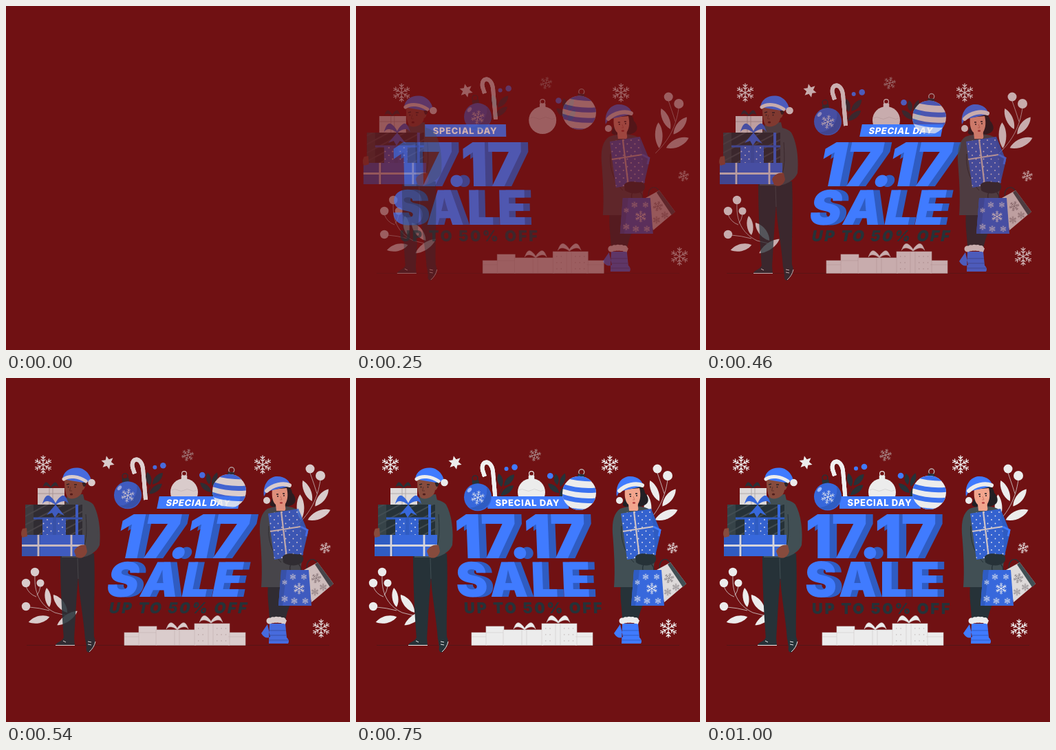
Animation of 500 by 500 pixels, one loop 1040 ms. Source, as an HTML page:

```html
<!DOCTYPE html>
<html lang="en">
<head>
<meta charset="utf-8">
<title>Special day sale</title>
<style>
html, body { margin: 0; width: 100%; height: 100%; overflow: hidden; background: #701113; }
svg { display: block; width: 100vw; height: 100vh; }
.art { opacity: var(--fade, 0); }
.fromRight { transform: translateX(calc(var(--d) * 1px)); }
.fromLeft { transform: translateX(calc(var(--d) * -1px)); }
.fromTop { transform: translateY(calc(var(--d) * -1px)); }
.fromTopLeft { transform: translate(calc(var(--d) * -.55px), calc(var(--d) * -.6px)); }
.fromTopRight { transform: translate(calc(var(--d) * .75px), calc(var(--d) * -.3px)); }
.hang { transform: translateY(calc(var(--d) * -.75px)); }
.title {
  opacity: var(--titleFade, 0);
  transform-origin: 0 335px;
  transform: translateX(calc(var(--x) * 1px)) skewX(calc(var(--lean) * 1rad));
  font-family: Inter, "Open Sans", sans-serif;
  font-weight: 900;
  text-anchor: middle;
}
.date { font-size: 88px; letter-spacing: -1.6px; }
.sale { font-size: 69.5px; letter-spacing: 4.8px; }
.offer { font-size: 22px; letter-spacing: 2.5px; fill: #263238; }
.tag { font-size: 13px; font-weight: 800; letter-spacing: .7px; fill: #fff; }
.blue { fill: #407bff; }
.deep { fill: #2f5cc2; }
.mid { fill: #3768dc; }
.dark { fill: #263238; }
.coat { fill: #414f54; }
.white { fill: #ececec; }
.line { fill: none; stroke: #ececec; }
.thin { fill: none; stroke: #d9d5d5; stroke-width: .8; }
.flake { fill: none; stroke: #f0f0f0; stroke-width: 1.35; stroke-linecap: round; }
.grey { stroke: #8b8589; }
.faint { stroke: #a88a8a; }
.manSkin { fill: #874b3d; }
.skin { fill: #f2a58d; }
</style>
</head>
<body>
<svg viewBox="0 0 500 500">
  <defs>
    <path id="arm" d="M0 0V-13M-2.800 -11.500L0 -8.800L2.800 -11.500M-2.800 -7.500L0 -5L2.800 -7.500"/>
    <g id="flake">
      <use href="#arm"/><use href="#arm" transform="rotate(60)"/><use href="#arm" transform="rotate(120)"/>
      <use href="#arm" transform="rotate(180)"/><use href="#arm" transform="rotate(240)"/><use href="#arm" transform="rotate(300)"/>
    </g>
    <path id="leaf" d="M0 15C-7 6 -6 -8 0 -15C6 -8 7 6 0 15Z"/>
    <path id="bow" d="M0 5C-6 0 -13 -1 -16 4C-13 -5 -10 -7 -6 -4C-3 -2 -1 1 0 3C1 1 3 -2 6 -4C10 -7 13 -5 16 4C13 -1 6 0 0 5Z"/>
    <g id="cap"><circle cy="-7" r="4" fill="none" stroke-width="1.4"/><rect x="-5" y="-4" width="10" height="7" rx="1" stroke="none"/></g>
    <pattern id="dots" width="11" height="11" patternUnits="userSpaceOnUse">
      <rect width="11" height="11" fill="#3462cf"/>
      <circle cx="2.5" cy="2.5" r=".9" fill="#e6e6f0"/><circle cx="8" cy="8" r=".9" fill="#e6e6f0"/>
    </pattern>
    <pattern id="hatch" width="11" height="11" patternUnits="userSpaceOnUse" patternTransform="rotate(-28)">
      <rect width="11" height="11" fill="#263238"/><path d="M0 5H11" stroke="#59646a" stroke-width="1"/>
    </pattern>
    <clipPath id="round"><circle cx="324.5" cy="166.5" r="24.5"/></clipPath>
  </defs>

  <!-- floor, plants, snow -->
  <path class="art" d="M30 388.500H470" stroke="#4d1719" stroke-width=".8"/>
  <g class="art"><g class="fromRight">
    <g class="flake">
      <use href="#flake" x="51" y="126"/>
      <use href="#flake" x="370" y="126"/>
      <use href="#flake" x="455" y="364"/>
      <use href="#flake" transform="translate(461 247) rotate(12) scale(.6)"/>
      <use class="faint" href="#flake" transform="translate(261 112) rotate(14) scale(.68)"/>
    </g>
    <g transform="translate(145 123) rotate(-12)">
      <path class="white" d="M0 -10L2.500 -4.300L8.700 -5L5 0L8.700 5L2.500 4.300L0 10L-2.500 4.300L-8.700 5L-5 0L-8.700 -5L-2.500 -4.300Z"/>
    </g>
    <g transform="translate(256 145)"><use href="#cap" fill="#ececec" stroke="#ececec" transform="scale(.85)"/></g>
    <circle class="white" cx="256" cy="166" r="20"/>
    <path d="M238 163q4 -3 9 0t9 0t9 0t9 0" fill="none" stroke="#d8d8d8"/>
    <path class="thin" d="M39 288C38 310 45 330 68 341L92 347M26 303Q30 314 41 318M47 303Q46 310 42 316M31 333Q45 334 60 338"/>
    <g class="white">
      <circle cx="39" cy="282" r="6.200"/><circle cx="26" cy="298" r="6.200"/>
      <circle cx="47" cy="298" r="5.500"/><circle cx="26" cy="332" r="6.200"/>
      <use href="#leaf" transform="translate(58 319) rotate(-8) scale(.9 .95)"/>
      <use href="#leaf" transform="translate(76 328) rotate(-38) scale(1.100)"/>
      <use href="#leaf" transform="translate(45 351) rotate(76) scale(1.050)"/>
      <use href="#leaf" transform="translate(86 349) rotate(55) scale(1 1.200)"/>
    </g>
    <path class="thin" d="M454 148C450 175 440 195 420 214M439 138Q445 155 449 168"/>
    <g class="white">
      <circle cx="439" cy="132" r="6.500"/><circle cx="454" cy="142" r="7"/>
      <use href="#leaf" transform="translate(435 164) rotate(-24) scale(1 1.100)"/>
      <use href="#leaf" transform="translate(456 174) rotate(38) scale(1.050)"/>
      <use href="#leaf" transform="translate(425 188) rotate(-2) scale(1.100 1.250)"/>
      <use href="#leaf" transform="translate(452 199) rotate(66) scale(1.200)"/>
    </g>
  </g></g>
  <g class="art"><g class="fromTopLeft">
    <circle class="blue" cx="230" cy="129" r="4.300"/><circle class="blue" cx="218" cy="131.500" r="3"/>
    <g class="dark">
      <use href="#leaf" transform="translate(209 148) rotate(-12) scale(.8 .65)"/>
      <use href="#leaf" transform="translate(222 148) rotate(42) scale(.85 .75)"/>
      <use href="#leaf" transform="translate(219 163) rotate(52) scale(.85 .8)"/>
    </g>
    <path d="M204 177Q208 168 212 160" fill="none" stroke="#263238"/>
  </g></g>
  <g class="art"><g class="fromTopRight">
    <circle class="blue" cx="283" cy="142" r="4.300"/>
    <g class="dark">
      <use href="#leaf" transform="translate(292 147) rotate(-8) scale(.7 .55)"/>
      <use href="#leaf" transform="translate(301 148) rotate(20) scale(.7)"/>
      <use href="#leaf" transform="translate(288 160) rotate(-50) scale(.8 .7)"/>
      <use href="#leaf" transform="translate(302 164) rotate(30) scale(.8 .7)"/>
    </g>
  </g></g>
  <g class="art"><g class="fromTop" fill="none" stroke-width="5.800">
    <path id="cane" d="M203 180L199 134C196 116 181 119 184 133L187 142" stroke="#f0f0f0"/>
    <use href="#cane" style="stroke:#407bff"/>
    <path d="M203 180L199 134C196 116 181 119 184 133L187 142" stroke="#f0f0f0" stroke-dasharray="4.200 4.200"/>
  </g></g>

  <!-- title -->
  <g class="title">
    <rect class="blue" x="194" y="172" width="118" height="18"/>
    <text class="tag" x="252.500" y="185.700">SPECIAL DAY</text>
    <g class="date">
      <text class="deep" x="249.500" y="262">17.17</text>
      <text class="blue" x="239" y="262">17.17</text>
    </g>
    <g class="sale">
      <text class="deep" x="253.500" y="318">SALE</text>
      <text class="blue" x="244" y="318">SALE</text>
    </g>
    <text class="offer" x="255.500" y="342.500">UP TO 50% OFF</text>
  </g>

  <!-- hanging ornaments -->
  <g class="art"><g class="hang">
    <use href="#cap" transform="translate(174 152) rotate(-8)" fill="#263238" stroke="#263238"/>
    <circle class="mid" cx="177" cy="172.500" r="20"/>
    <path class="deep" d="M190 157A20 20 0 0 1 165 188A26 26 0 0 0 190 157Z"/>
    <g class="flake"><use href="#flake" transform="translate(177 173) rotate(10) scale(.75)" stroke-width="1"/></g>
    <ellipse cx="165" cy="162" rx="2.500" ry="4" transform="rotate(40 165 162)" fill="#9dbbff"/>
  </g></g>
  <g class="art"><g class="hang">
    <use href="#cap" transform="translate(327 143) rotate(6)" fill="#263238" stroke="#b9b0b0"/>
    <circle class="white" cx="324.500" cy="166.500" r="24.500"/>
    <g clip-path="url(#round)" fill="none" stroke="#3b72f0">
      <path d="M300 140Q325 147 350 146" stroke-width="7"/>
      <path d="M298 156Q324 165 351 162" stroke-width="7"/>
      <path d="M298 171Q324 180 351 177" stroke-width="7"/>
      <path d="M298 186Q320 195 345 191" stroke-width="5"/>
    </g>
  </g></g>

  <!-- parcels on the floor -->
  <g class="art"><g class="fromRight">
    <g class="white" stroke="#cfc9c9" stroke-width=".6">
      <rect x="169" y="370" width="22" height="18.500"/>
      <rect x="190" y="361" width="26" height="27.500"/>
      <rect x="320" y="370" width="25" height="18.500"/>
      <rect x="215" y="366" width="58" height="22.500"/>
      <rect x="271" y="357" width="51" height="31.500"/>
      <path d="M242 366V388M249 366V388M291 357V388M298 357V388M190 370H215M320 376H345M169 376H190" fill="none"/>
      <use href="#bow" x="246" y="361"/>
      <use href="#bow" transform="translate(295 351) scale(1.050)"/>
    </g>
    <path d="M276 364H288M276 373H288M276 382H288M303 364H320M303 373H320M303 382H320" stroke="#c8c2c2" stroke-width="1.400" stroke-dasharray="1.400 5"/>
  </g></g>

  <!-- man with boxes -->
  <g class="art"><g class="fromLeft">
    <path class="dark" d="M82 255H131C133 300 130 340 131 379L118 380C116 350 109 315 108 290C105 320 104 350 102 379H87C84 340 82 300 82 255Z"/>
    <path d="M107 262L108 292" stroke="#414f54" fill="none"/>
    <path class="dark" d="M87 377H102L103 389H75C75 384 84 384 87 377ZM118 378L131 376C135 386 132 391 124 399C120 399 119 395 120 391Z"/>
    <path class="line" d="M75 388.500H103M133 383Q131 392 124 398M86 382l4 2M122 383l5 1M122 387l5 1" stroke-width="1"/>
    <path class="coat" d="M90 176C104 174 123 176 130 184C138 198 141 222 139 243C135 253 122 260 112 261H84V200Z"/>
    <path class="coat" d="M92 170L115 169L118 182H90Z"/>
    <path d="M119 198C120 215 121 230 117 243" fill="none" stroke="#263238" stroke-width="1"/>
    <path class="manSkin" d="M88 147H114C119 152 119 162 114 163C113 172 103 177 95 175C89 172 88 160 88 147Z"/>
    <path d="M113 149H119C120 154 119 158 116 158C114 156 114 153 113 149Z" fill="#2a2427"/>
    <path d="M91 155l4 -1M102 155l4 0" stroke="#2a2427" stroke-width="1.300"/>
    <circle cx="93.500" cy="158.500" r="1" fill="#2a2427"/><circle cx="103.500" cy="158.500" r="1" fill="#2a2427"/>
    <path d="M97 158L95.500 164H99" fill="none" stroke="#63352c"/>
    <ellipse cx="98" cy="169" rx="2.200" ry="1.600" fill="#4f1e1c"/>
    <path class="blue" d="M85 147C87 132 102 128 114 132C122 136 126 143 127 150L115 152Z"/>
    <path d="M87 147C95 141 109 143 119 150" fill="none" stroke="#ececec" stroke-width="5" stroke-linecap="round"/>
    <circle class="white" cx="127.500" cy="152" r="5.300"/>
    <rect x="49" y="160" width="39" height="25" fill="#dedada"/>
    <path d="M66 160V185M71 160V185M49 168H88" stroke="#b0aaaa"/>
    <use class="dark" href="#bow" transform="translate(68 156) scale(.72 .85)"/>
    <rect x="31" y="184" width="83" height="45" fill="url(#hatch)"/>
    <path d="M31 184H43V229H31Z" fill="#414f54" opacity=".6"/>
    <path d="M106 184V229" stroke="#3768dc" stroke-width="4"/>
    <path d="M43 204H114" stroke="#2f5cc2" stroke-width="3"/>
    <rect x="56" y="203" width="34" height="26" fill="url(#dots)"/>
    <path class="deep" d="M71 203H76V229H71Z"/>
    <use class="mid" href="#bow" transform="translate(75 178) scale(1.200 1.350)"/>
    <path class="mid" d="M75 184L62 199L70 196L74 203L79 196L88 200Z"/>
    <path class="deep" d="M26 228H117V259H26Z"/>
    <path class="mid" d="M53 228H117V259H53Z"/>
    <path d="M26 243.500H117M50 228V259M98 228V259" stroke="#d6d4da" stroke-width="2.800"/>
    <path class="manSkin" d="M27 219L33 218L34 230L27 232C24 228 25 223 27 219ZM119 243C112 241 104 246 102 252L105 260C112 264 119 260 121 252Z"/>
  </g></g>

  <!-- woman with bags -->
  <g class="art"><g class="fromLeft">
    <path class="dark" d="M384 300H426C421 322 412 334 409 353H386C386 335 382 320 384 300Z"/>
    <path class="blue" d="M383 358L374 371C378 378 383 379 387 376ZM386 357H409L411 377C414 380 415 383 413 386H385Z"/>
    <path d="M386 367H410M386 374H411M385 381H413" stroke="#2f5cc2" stroke-width="1"/>
    <path d="M386 353Q397 349 410 354" fill="none" stroke="#ececec" stroke-width="9" stroke-linecap="round" stroke-dasharray="0 5"/>
    <path d="M386 354Q397 350 410 355" fill="none" stroke="#ececec" stroke-width="6"/>
    <path d="M392 155C404 148 418 156 419 167C425 173 426 182 418 185C408 189 394 189 388 186C384 183 391 178 390 172Z" fill="#211f24"/>
    <path class="coat" d="M383 190C397 185 413 185 424 190C434 202 439 217 437 240C433 262 431 284 427 304H374C376 280 374 250 372 226C371 208 374 196 383 190Z"/>
    <path d="M385 215C383 235 390 255 403 268" fill="none" stroke="#263238" stroke-width="1"/>
    <path class="skin" d="M390 162L411 160C413 167 413 177 409 183C408 188 411 190 408 193H396L395 184C390 180 389 170 390 162Z"/>
    <path d="M396 169h3M405 168h3" stroke="#211f24" stroke-width="1.400"/>
    <circle cx="398" cy="172" r="1" fill="#211f24"/><circle cx="407" cy="171" r="1" fill="#211f24"/>
    <path d="M402 172L404 177H401" fill="none" stroke="#cc7563"/>
    <ellipse cx="403" cy="181.500" rx="2.200" ry="1.200" fill="#b03b3b"/>
    <path class="blue" d="M378 172C376 157 383 145 395 143C408 142 415 149 417 157L382 165Z"/>
    <path d="M382 164C391 155 406 152 415 156" fill="none" stroke="#ececec" stroke-width="6" stroke-linecap="round"/>
    <circle class="white" cx="382" cy="178" r="5"/>
    <path class="deep" d="M428 190L442 224L434 258Z"/>
    <path d="M384 197L428 190L435 257L393 264Z" fill="url(#dots)"/>
    <path d="M403 194L411 261M387 223L431 216" stroke="#cfc4c6" stroke-width="2.200"/>
    <path d="M431 216L441 221L439 230" fill="none" stroke="#407bff" stroke-width="3"/>
    <path class="dark" d="M405 260C411 252 422 257 430 256C436 258 437 265 432 269C424 275 411 272 406 268Z"/>
    <path d="M416 279C413 266 431 264 432 279M441 279C437 264 451 258 456 270" fill="none" stroke="#263238" stroke-width="1.400"/>
    <path d="M436 279L456 268L479 299L447 326Z" fill="#dedada"/>
    <path d="M456 268L479 299L474 304L452 271Z" fill="#414f54"/>
    <g class="flake grey">
      <use href="#flake" transform="translate(454 291) rotate(15) scale(.55)"/>
      <use href="#flake" transform="translate(464 304) scale(.4)"/>
      <use href="#flake" transform="translate(452 311) scale(.4)"/>
    </g>
    <path class="mid" d="M403 279H443L447 331H399Z"/>
    <path class="deep" d="M403 279L411 279L405 331H399Z"/>
    <g class="flake">
      <use href="#flake" transform="translate(429 306) scale(.62)"/>
      <use href="#flake" transform="translate(436 289) scale(.32)"/>
      <use href="#flake" transform="translate(420 289) scale(.34)"/>
      <use href="#flake" transform="translate(408 297) scale(.28)"/>
      <use href="#flake" transform="translate(408 321) scale(.36)"/>
      <use href="#flake" transform="translate(422 324) scale(.36)"/>
      <use href="#flake" transform="translate(438 324) scale(.34)"/>
    </g>
  </g></g>
</svg>
<script>
const LOOP = 1040, STEP = 1000 / 24;
const drift = [[2, 20], [4, 18], [8, 12], [11, 6], [13, 3], [18, -1], [24, 0]];
const slide = [[2, -222], [4, -153], [8, -37], [11, 0], [13, -4], [18, 3], [24, 0]];
const tilt = [[2, -45], [4, -27], [8, 18], [11, 31], [13, 31], [18, -6], [24, 0]];
const root = document.documentElement.style;
const clamp = v => Math.min(1, Math.max(0, v));

// Smooth curve through [step, value] keys
function track(keys, n) {
  const last = keys.length - 1;
  if (n <= keys[0][0]) return keys[0][1];
  if (n >= keys[last][0]) return keys[last][1];
  const slope = i => {
    const a = keys[Math.max(i - 1, 0)], b = keys[Math.min(i + 1, last)];
    return (b[1] - a[1]) / (b[0] - a[0]);
  };
  const i = keys.findIndex(k => k[0] > n) - 1;
  const [n0, v0] = keys[i], [n1, v1] = keys[i + 1];
  const w = n1 - n0, u = (n - n0) / w, s = 1 - u;
  return v0 * (1 + 2 * u) * s * s + v1 * u * u * (3 - 2 * u)
    + w * u * s * (slope(i) * s - slope(i + 1) * u);
}

function draw(now) {
  const n = Math.min(24, Math.floor((now % LOOP + 5) / STEP));
  root.setProperty('--d', track(drift, n));
  root.setProperty('--x', track(slide, n));
  root.setProperty('--lean', -Math.atan(track(tilt, n) / 154));
  root.setProperty('--fade', clamp((n - 1) / 14));
  root.setProperty('--titleFade', clamp((n - 1) / 7.5));
}

const start = performance.now();
function tick() {
  draw(performance.now() - start);
  requestAnimationFrame(tick);
}
tick();
</script>
</body>
</html>
```
